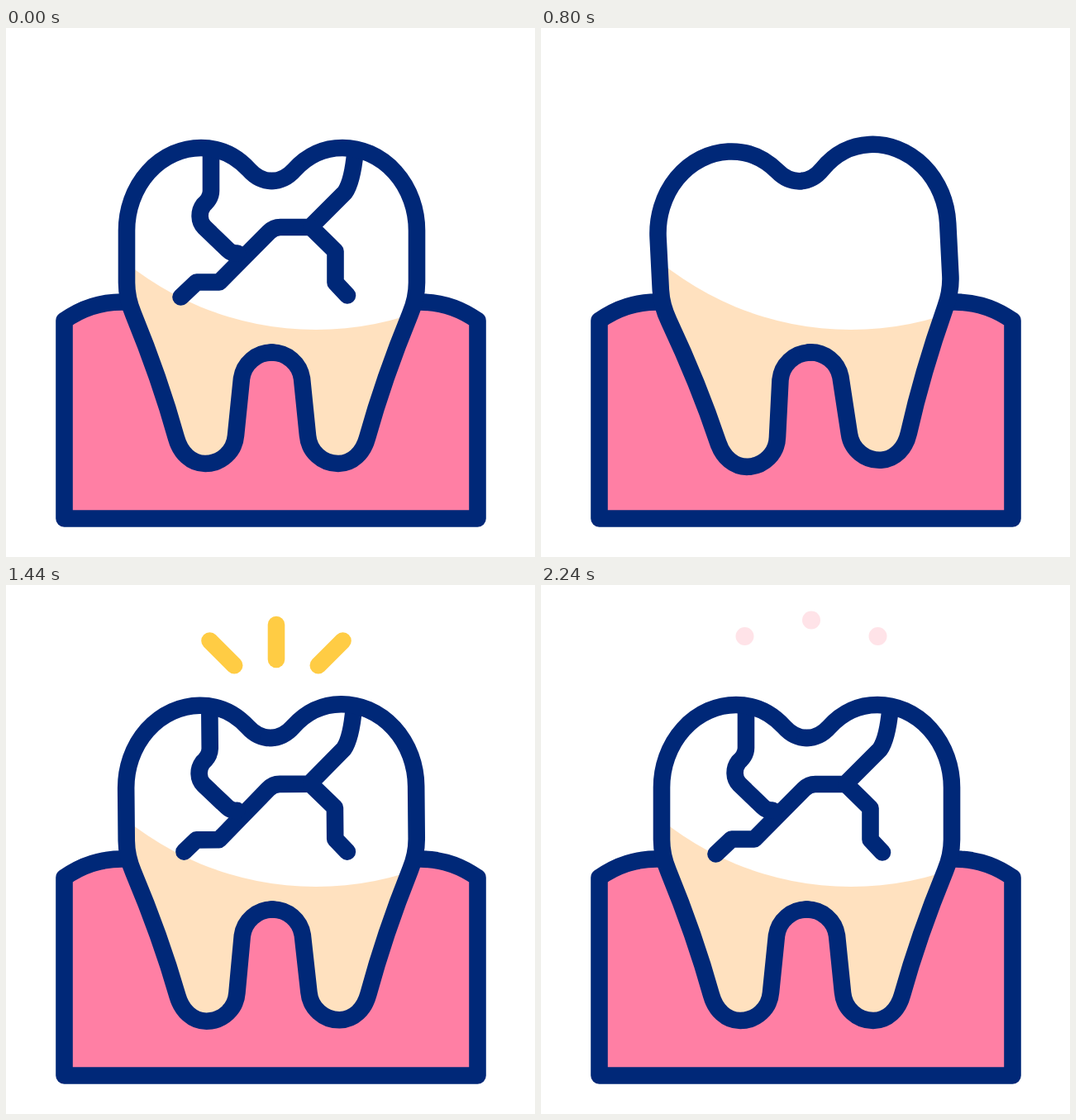
An HTML page for the animation above (3 s loop, 640x640 px).

```html
<!DOCTYPE html>
<html lang="en">
<head>
<meta charset="utf-8">
<title>Cracked tooth</title>
<style>
  html, body { margin: 0; width: 100%; height: 100%; overflow: hidden; background: #fff; }
  svg { display: block; width: 100vw; height: 100vh; }
  .line { fill: none; stroke: #002878; stroke-width: 20.6; stroke-linecap: round; stroke-linejoin: round; }
  .gum { fill: #ff7fa4; }
</style>
</head>
<body>
<svg viewBox="0 0 640 640">
  <defs>
    <!-- Left half of the tooth, from the notch to the arch; overlaps the axis a little -->
    <path id="half" d="M323 185H321.5Q306 185 294 171.500C279 155 259 145 236 145A90 100 0 0 0 146 245V308Q146 327 154 346Q186 424 206 496C211 514 224 527 241 527A37 37 0 0 0 278 493L285 424A36.800 36.800 0 0 1 321.500 392.500H323"/>
    <clipPath id="inside">
      <use href="#half"/>
      <use href="#half" transform="matrix(-1 0 0 1 643 0)"/>
    </clipPath>
  </defs>
  <path class="line gum" d="M70.500 354Q102 331.500 140 331.500H501Q539 331.500 570.500 354V593.500H70.500Z"/>
  <g clip-path="url(#inside)">
    <rect width="640" height="640" fill="#ffe1bf"/>
    <circle cx="375" cy="-1" r="366" fill="#fff"/>
  </g>
  <g id="tooth" class="line">
    <path id="main" pathLength="1" d="M422.500 150Q419 186 410 199L368 241H332Q324 241 318 247L258 307.500H230.500L211.500 325.500"/>
    <path id="right" pathLength="1" d="M370 242L398.500 270V308L413 323.500"/>
    <path id="left" pathLength="1" d="M280 272.500Q273 273 268 268L240 241C233 234 233 222 239 214Q248 206 248 197V147"/>
    <use href="#half"/>
    <use href="#half" transform="matrix(-1 0 0 1 643 0)"/>
  </g>
  <g id="rays" stroke-linecap="round">
    <line/><line/><line/>
  </g>
</svg>
<script>
const $ = id => document.getElementById(id);
const mix = (a, b, u) => a + (b - a) * u;
const span = (t, a, b) => Math.max(0, Math.min(1, (t - a) / (b - a)));

const STEP = 40, LOOP = 3000, LAST = 2240;
const FLASH_START = 1160, FLASH = 560;

// Peaks alternate in sign and halve after each pair
const peak = k => k < 1 || k > 6 ? 0 : (-1) ** k * 8 / 2 ** Math.floor((k - 1) / 2);

function swing(t) {
  const k = 7 * span(t, 44, 1864), i = Math.floor(k);
  return mix(peak(i), peak(i + 1), k - i);
}

// Shrinks with an ease-in, grows back with an ease-out
function crack(id, t, gone, power, from, full) {
  const part = t < 780 ? 1 - span(t, 24, gone) ** power : 1 - (1 - span(t, from, full)) ** 2;
  const el = $(id);
  el.style.display = part > 0.001 ? "" : "none";
  el.setAttribute("stroke-dasharray", part > 0.999 ? "none" : `${part} 2`);
}

function drawRays(t) {
  const u = t > FLASH_START ? (t - FLASH_START) % FLASH / FLASH : 0;
  $("rays").style.display = u ? "" : "none";
  const tail = 42 * (1 - span(u, 0.5, 0.92)), tip = 42 * (1 - span(u, 0, 0.5));
  const lift = 12.8 * (0.5 - Math.min(u, 0.93));
  const fade = span(u, 0.78, 0.92);
  $("rays").setAttribute("stroke", `rgb(255,${mix(204, 227, fade)},${mix(68, 232, fade)})`);
  $("rays").setAttribute("stroke-width", mix(20.6, 22, fade));
  [...$("rays").children].forEach((ray, i) => {
    const side = i - 1, angle = side * Math.PI / 4;
    const place = (n, d) => {
      ray.setAttribute("x" + n, 327 + 80.5 * side - d * Math.sin(angle));
      ray.setAttribute("y" + n, 48 + 19.5 * Math.abs(side) + lift + d * Math.cos(angle));
    };
    place(1, tip);
    place(2, tail + 0.01);
  });
}

function draw(now) {
  const t = Math.min(LAST, Math.floor(now % LOOP / STEP) * STEP);
  const turn = `rotate(${swing(t)} 321.5 336)`;
  $("inside").setAttribute("transform", turn);
  $("tooth").setAttribute("transform", turn);
  crack("main", t, 714, 2, 872, 1530);
  crack("right", t, 570, 3, 1075, 1420);
  crack("left", t, 660, 3, 1190, 1430);
  drawRays(t);
}

const start = performance.now();
function frame() {
  draw(performance.now() - start);
  requestAnimationFrame(frame);
}
frame();
</script>
</body>
</html>
```
